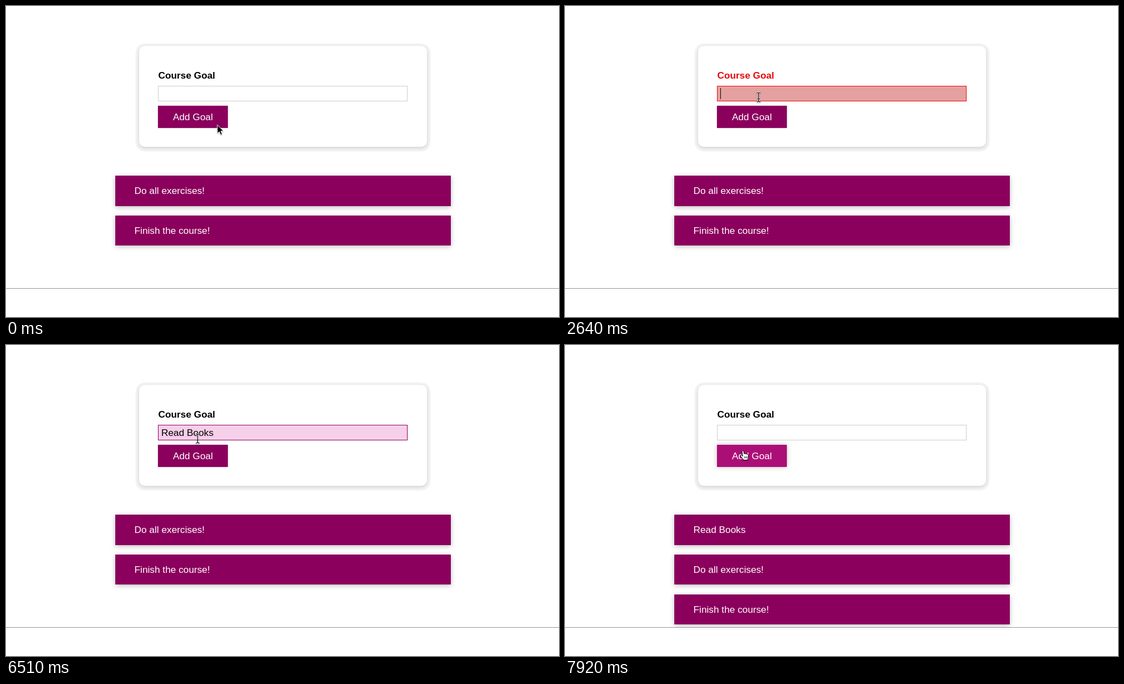
An HTML page for the animation above (8 s loop, 997 by 561 pixels).

```html
<!DOCTYPE html>
<html lang="en">
<head>
<meta charset="utf-8">
<title>Course goals</title>
<style>
  html, body { margin: 0; width: 100%; height: 100%; overflow: hidden; background: #fff; }
  body { position: relative; font: 17.28px/20px "Liberation Sans", Arial, sans-serif; color: #000; }
  .card, .label, .field, .button, .goals, .rule, .pointer { position: absolute; box-sizing: border-box; }
  .card {
    left: 240px; top: 72px; width: 518.5px; height: 182px; border-radius: 10.5px; background: #fff;
    box-shadow: 0 2px 7px rgba(0, 0, 0, .16), 0 2px 0 6.5px #f5f5f5;
  }
  .label { left: 274.5px; top: 115px; font-weight: bold; }
  .field {
    left: 274px; top: 144px; width: 450px; height: 28px; padding: 3px 5px;
    border: 1px solid #ccc; white-space: pre;
  }
  .caret { display: inline-block; width: 1px; height: 20px; margin-left: -.5px; vertical-align: top; background: #000; }
  .button {
    left: 274px; top: 180px; width: 126px; height: 40px; line-height: 40px; text-align: center;
    color: #fff; background: #8b005d; box-shadow: 0 0 4px rgba(0, 0, 0, .2);
  }
  .button.hover { background: #ac0e77; box-shadow: 0 0 8.6px rgba(0, 0, 0, .26); }
  .focus .field { background: #f6cfe9; border-color: #8b005d; }
  .invalid .label { color: #e60a0a; }
  .invalid .field { background: #e5a0a0; border-color: #e60a0a; }
  .goals { left: 197px; top: 306.4px; width: 604.5px; margin: 0; padding: 0; list-style: none; }
  .goals li {
    height: 54.4px; margin-bottom: 17.3px; padding-left: 34.5px; line-height: 54.4px;
    color: #fff; background: #8b005d; box-shadow: 0 2px 8.6px rgba(0, 0, 0, .26);
  }
  .rule { left: 0; top: 509px; width: 100%; height: 1px; background: #959595; }
  .pointer { left: 0; top: 0; width: 1px; height: 1px; overflow: visible; filter: drop-shadow(0 1px 1px rgba(0, 0, 0, .3)); }
  .pointer g { display: none; }
  .pointer g.on { display: inline; }
  [hidden] { display: none !important; }
</style>
</head>
<body>
  <div class="card"></div>
  <div id="form">
    <div class="label">Course Goal</div>
    <div class="field"><span id="typed"></span><span id="caret" class="caret"></span></div>
    <div id="button" class="button">Add Goal</div>
  </div>
  <ul class="goals">
    <li id="added">Read Books</li>
    <li>Do all exercises!</li>
    <li>Finish the course!</li>
  </ul>
  <div class="rule"></div>
  <svg id="pointer" class="pointer">
    <g id="arrow" stroke="#fff" stroke-linejoin="round">
      <path d="M0 0V15.5L3.6 12.2 6.1 18 8.8 16.8 6.3 11.2H11.2Z"/>
    </g>
    <g id="beam" fill="none">
      <path id="beamLine" stroke="#fff" stroke-width="2.6" d="M-3.5 -8.5Q0 -8.5 0 -6Q0 -8.5 3.5 -8.5M0 -6V6M-3.5 8.5Q0 8.5 0 6Q0 8.5 3.5 8.5M-2 3H2"/>
      <path stroke="#000" stroke-width="1.2" d="M-3.5 -8.5Q0 -8.5 0 -6Q0 -8.5 3.5 -8.5M0 -6V6M-3.5 8.5Q0 8.5 0 6Q0 8.5 3.5 8.5M-2 3H2"/>
    </g>
    <g id="hand" fill="#fff" stroke="#000" stroke-linejoin="round">
      <path d="M-2 1.5C-2 -.3 .6 -.5 1 1.3L2.2 6C2.6 4.8 4.6 5 4.8 6.3 5.4 5.2 7.2 5.6 7.3 7 8.2 6.2 9.6 6.8 9.6 8.3V11.5C9.6 13.5 8.4 14.5 8.2 17H.8C.2 14.5 -2.6 12.6 -4.2 10.2 -5 8.8 -3.6 7.6 -2.2 8.6L-.4 10.2Z"/>
      <path d="M2.8 10.5V14M5 10.5V14M7.2 10.5V14" stroke-width=".9"/>
    </g>
  </svg>
<script>
  const $ = id => document.getElementById(id);
  const LOOP = 8000, GOAL = 'Read Books';
  const INVALID = 1710, TYPING = 3990, MOVE = 6510, PRESS = 7080, SUBMIT = 7170;

  const keyTimes = [TYPING, 4140, 4230, 4440, 4620, 4950, 5070, 5160, 5250, 5730];
  const caretOn = [[2550, 3000], [3450, 3930], [TYPING, 6120], [6570, PRESS]];
  // time, x, y of the pointer's hot spot
  const path = [
    [0, 381, 214.5], [480, 381, 214.5], [660, 368, 206.5], [2130, 368, 206.5], [2460, 349, 164.5],
    [TYPING, 349, 164.5], [MOVE, 345.5, 168.5], [6540, 345.5, 168.5], [6930, 321, 190.5], [LOOP, 321, 190.5]
  ];

  const within = (t, [from, to]) => t >= from && t < to;

  function pointerAt(t) {
    const i = path.findIndex(p => p[0] > t);
    const [t0, x0, y0] = path[i - 1], [t1, x1, y1] = path[i];
    const k = (t - t0) / (t1 - t0), e = k * k * (3 - 2 * k);
    return [x0 + (x1 - x0) * e, y0 + (y1 - y0) * e];
  }

  function draw(t) {
    const [x, y] = pointerAt(t);
    const hover = t >= MOVE && y > 180;
    const shape = y < 172 ? 'beam' : hover ? 'hand' : 'arrow';
    $('pointer').style.transform = `translate(${x}px, ${y}px)`;
    for (const id of ['arrow', 'beam', 'hand'])
      $(id).classList.toggle('on', id === shape && !within(t, [TYPING, MOVE]));

    $('button').classList.toggle('hover', hover);
    $('form').classList.toggle('invalid', within(t, [INVALID, TYPING]));
    $('form').classList.toggle('focus', within(t, [TYPING, PRESS]));

    const count = t < SUBMIT ? keyTimes.filter(k => k <= t).length : 0;
    $('typed').textContent = GOAL.slice(0, count);
    $('caret').hidden = !caretOn.some(span => within(t, span));
    $('added').hidden = t < SUBMIT;
  }

  const start = performance.now();
  function tick() {
    draw((performance.now() - start) % LOOP);
    requestAnimationFrame(tick);
  }
  tick();
</script>
</body>
</html>
```
